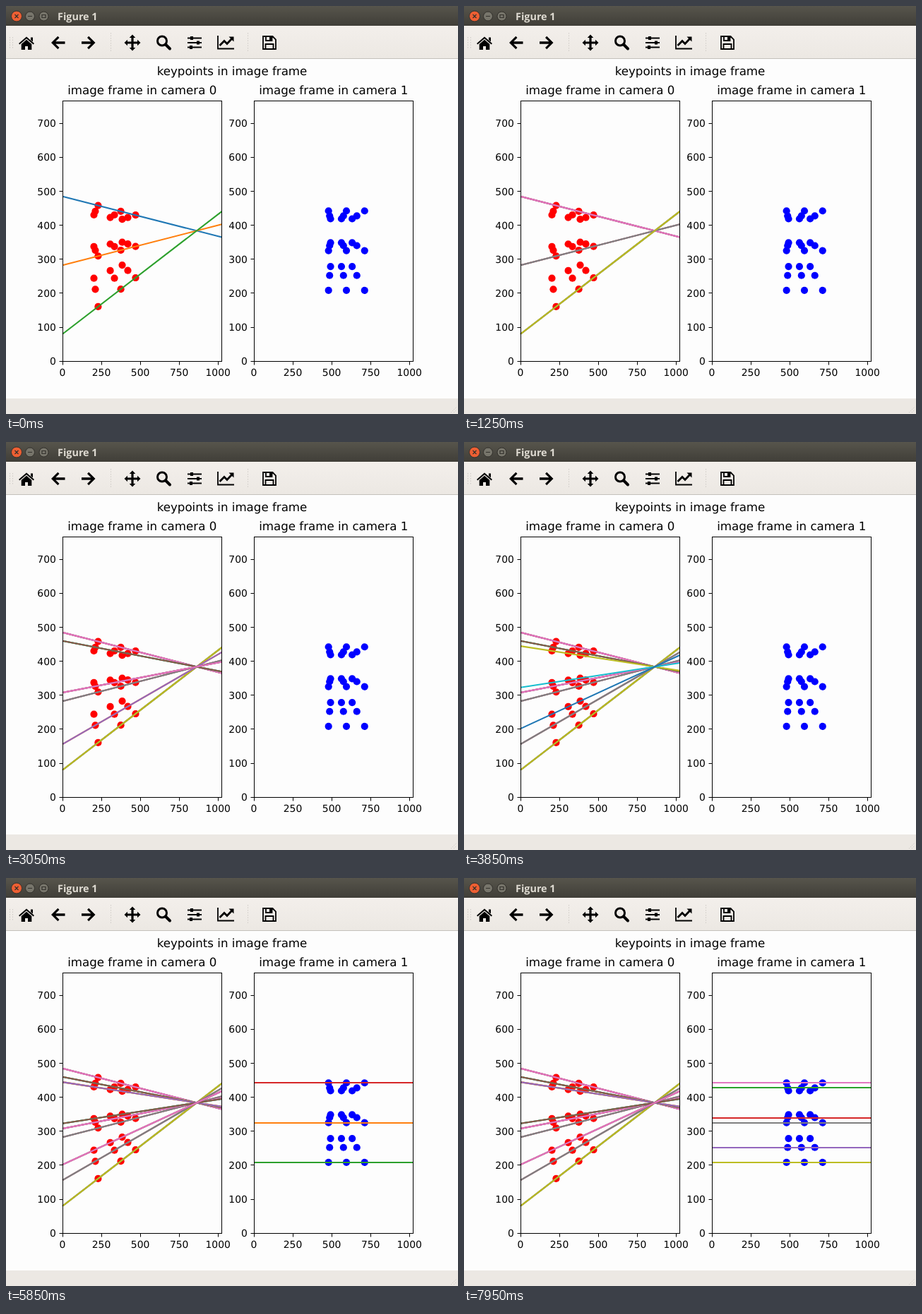
Recreate the animation shown at these times as an HTML page. Size 640x578 px, loop 8000 ms.

```html
<!DOCTYPE html>
<html lang="en">
<head>
<meta charset="utf-8">
<title>Figure 1</title>
<style>
  html, body { margin: 0; width: 100%; height: 100%; overflow: hidden; background: #fdfdfd; }
  svg { display: block; width: 100%; height: 100%; }
  text { font-family: "DejaVu Sans", sans-serif; font-size: 13.89px; fill: #000; text-rendering: geometricPrecision; }
  .title { font-size: 16.67px; text-anchor: middle; }
  .window { font: 700 14.4px "Open Sans", sans-serif; fill: #dfdbd2; }
  .axis { fill: none; stroke: #000; stroke-width: 1; }
  .epiline { stroke-width: 2.08; }
</style>
</head>
<body>
<svg id="stage" viewBox="0 0 640 578">
  <defs>
    <linearGradient id="bar" x2="0" y2="1">
      <stop stop-color="#57554c"/><stop offset="1" stop-color="#403e38"/>
    </linearGradient>
    <linearGradient id="tools" x2="0" y2="1">
      <stop stop-color="#f3efeb"/><stop offset="1" stop-color="#ece8e3"/>
    </linearGradient>
  </defs>
  <rect width="640" height="578" fill="#fdfdfd"/>

  <rect width="640" height="28" fill="url(#bar)"/>
  <g stroke="#33312c">
    <circle cx="15" cy="14.5" r="7.5" fill="#ee5f33"/>
    <circle cx="34" cy="14.5" r="6.5" fill="#77756b"/>
    <circle cx="53.5" cy="14.5" r="6.5" fill="#77756b"/>
    <path d="M12.5 12l5 5m0-5l-5 5M31 14.5h6M51 12.5h5v4h-5z" fill="none" stroke-width="1.2"/>
  </g>
  <text class="window" x="73" y="20">Figure 1</text>

  <rect y="28" width="640" height="46" fill="url(#tools)"/>
  <path d="M0 74.5H640" stroke="#c4c0bb"/>
  <path d="M5.5 44v16M9.5 44v16M148.5 38v28M342.5 38v28" stroke="#cfcbc6" stroke-dasharray="1.5 2"/>
  <g fill="#000" stroke="none">
    <path d="M29 43.5L40 53l-1.3 1.4L29 46.2l-9.7 8.2L18 53zM35 44.5h3v6l-3-2.6z"/>
    <path d="M29 47.8l7.3 6.2v8h-5.3v-5h-4v5h-5.3v-8z"/>
    <path id="arrow" d="M64 52l9.3-9.3 2.2 2.2-5.3 5.4H83.5v3.4H70.2l5.3 5.4-2.2 2.2z"/>
    <use href="#arrow" transform="matrix(-1 0 0 1 190.5 0)"/>
    <path d="M179 40.5l4.3 4.5h-2.7v5.4h5.4v-2.7l4.5 4.3-4.5 4.3v-2.7h-5.4v5.4h2.7l-4.3 4.5-4.3-4.5h2.7v-5.4H172v2.7L167.5 52l4.5-4.3v2.7h5.4V45h-2.7z"/>
    <g fill="none" stroke="#000">
      <circle cx="221" cy="49.5" r="6.5" stroke-width="3"/>
      <path d="M226 54.5l6 6" stroke-width="4" stroke-linecap="round"/>
      <path d="M257 45.5h20M257 52h20M257 58.5h20" stroke-width="1.8"/>
      <path d="M263 43v5M272 49.5v5M262 56v5" stroke-width="4"/>
      <path d="M300 42v18.5h23" stroke-width="1.8"/>
      <path d="M302.5 56l6.5-6.5 4 4 7-7.5" stroke-width="2.8"/>
      <path d="M364 43h13.5l4.5 4.5V61h-18zM368 43v6h8.5v-6M367.5 61v-7h11v7" stroke-width="1.8"/>
    </g>
    <path d="M315.5 43.5h7v7zM373 43h3.5v6H373z"/>
  </g>

  <rect y="556" width="640" height="22" fill="#ece8e3"/>
  <path d="M630 576l8-8M634 576l4-4" stroke="#d0ccc6" stroke-dasharray="1.5 1.5"/>

  <text class="title" x="320" y="98">keypoints in image frame</text>
  <g id="plots"></g>
</svg>

<script>
const COLORS = ["#1f77b4", "#ff7f0e", "#2ca02c", "#d62728", "#9467bd",
                "#8c564b", "#e377c2", "#7f7f7f", "#bcbd22", "#17becf"];
const LOOP = 8000, LINE_INTERVAL = 203.5, INITIAL_LINES = 3;
const IMAGE = { width: 1024, height: 768 };
const PLOT = { top: 134.5, bottom: 503.5, width: 225 };

// Keypoints form a 3 x 3 x 3 lattice: each depth has three rows of three points.
const ROWS = [1, -1, -3], DEPTHS = [3, 4, 5];
const cameras = [
  { left: 80, dot: "#ff0000", spread: 304, pole: 863,
    columns: [[229, 375, 470], [211, 334, 420], [202, 307, 384]] },
  { left: 351, dot: "#0000ff", spread: 175.5, pole: Infinity,
    columns: [[480, 595, 712], [487, 576, 662], [493, 563, 632]] }
];

const toX = u => u * 225.45 / IMAGE.width;
const toY = v => 503.2 - v * 369.6 / IMAGE.height;
const crisp = p => Math.floor(p) + 0.5;

// All epipolar lines of a camera meet at its pole, halfway up the image.
const lineY = ({ spread, pole }, depth, row, u) =>
  toY(IMAGE.height / 2 + row * spread / depth * (1 - u / pole));

function add(parent, tag, attrs, content = "") {
  const node = document.createElementNS("http://www.w3.org/2000/svg", tag);
  for (const key in attrs) node.setAttribute(key, attrs[key]);
  node.textContent = content;
  return parent.appendChild(node);
}

function drawAxes(group, index) {
  add(group, "rect", { class: "axis", x: 0.5, y: PLOT.top,
                       width: PLOT.width, height: PLOT.bottom - PLOT.top });
  for (let u = 0; u <= 1000; u += 250) {
    add(group, "path", { class: "axis", d: `M${crisp(toX(u))} ${PLOT.bottom}v5` });
    add(group, "text", { x: toX(u), y: 524, "text-anchor": "middle" }, u);
  }
  for (let v = 0; v <= 700; v += 100) {
    add(group, "path", { class: "axis", d: `M0.5 ${crisp(toY(v))}h-5` });
    add(group, "text", { x: -9.2, y: Math.round(toY(v)) + 5, "text-anchor": "end" }, v);
  }
  add(group, "text", { class: "title", x: 112.7, y: 125 }, `image frame in camera ${index}`);
}

const lines = [];
cameras.forEach((camera, index) => {
  const { left, dot, pole, columns } = camera;
  const group = add(document.getElementById("plots"), "g", { transform: `translate(${left})` });
  DEPTHS.forEach((depth, layer) => {
    for (const row of ROWS)
      for (const u of columns[layer])
        add(group, "circle", { cx: toX(u), cy: lineY(camera, depth, row, u), r: 5.1, fill: dot });
  });

  // Every line is drawn once per keypoint, each time in the next colour.
  const snap = pole === Infinity ? Math.round : y => y;
  for (let i = 0; i < 27; i++) {
    const depth = DEPTHS[Math.floor(i / 9)], row = ROWS[i % 3];
    lines.push(add(group, "line", {
      class: "epiline", stroke: COLORS[i % COLORS.length],
      x1: 0, y1: snap(lineY(camera, depth, row, 0)),
      x2: toX(IMAGE.width), y2: snap(lineY(camera, depth, row, IMAGE.width))
    }));
  }
  drawAxes(group, index);
});

const start = performance.now();
function render(now) {
  const time = Math.max(0, now - start) % LOOP;
  const count = INITIAL_LINES + Math.floor(time / LINE_INTERVAL);
  lines.forEach((line, i) => line.style.display = i < count ? "" : "none");
  requestAnimationFrame(render);
}
render(start);
</script>
</body>
</html>
```
